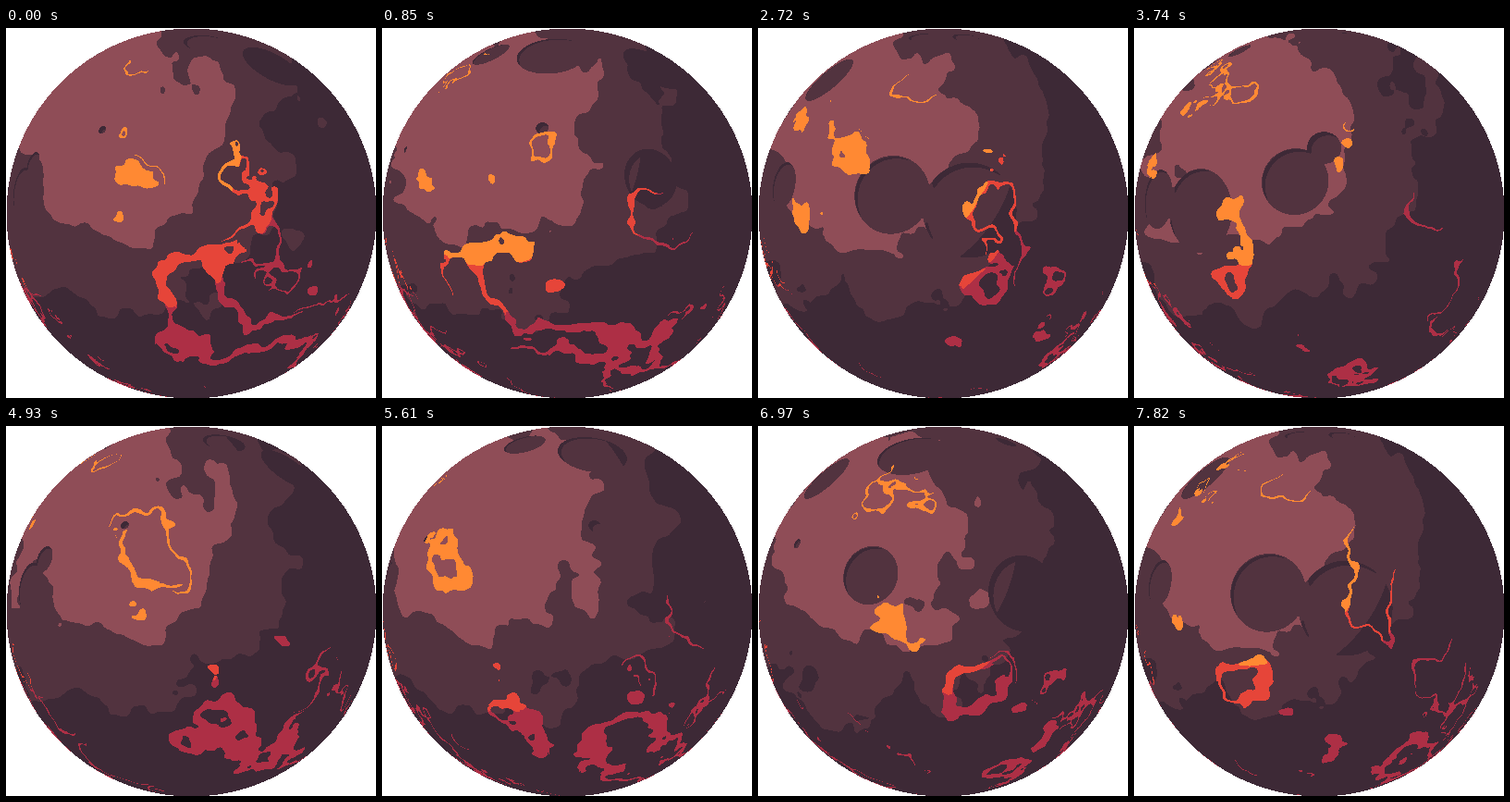
Write an HTML page with a canvas that moves like this. It is 400 px wide and 400 px high and loops after 7.99 s.

```html
<!DOCTYPE html>
<html lang="en">
<head>
<meta charset="utf-8">
<title>Lava planet</title>
<style>
  html, body { margin: 0; width: 100%; height: 100%; overflow: hidden; background: #fff; }
  canvas { display: block; width: 100vw; height: 100vh; }
</style>
</head>
<body>
<canvas id="stage" width="400" height="400"></canvas>
<script>
const SIZE = 400, STEP_MS = 170, STEPS = 47, STEPS_PER_TURN = 60;
const SEED = 8.24, LIGHT = 0.3;

// Colours as little-endian ABGR, ready for a Uint32 view of the pixels.
const color = hex => {
  const n = parseInt(hex, 16);
  return (0xff000000 | (n & 255) << 16 | n & 0xff00 | n >> 16) >>> 0;
};
const LAND = ['8f4d57', '52333f', '3d2936'].map(color);
const LAVA = ['ff8933', 'e64539', 'ad2f45'].map(color);
const shade = (colors, value, border1, border2) =>
  colors[value > border2 ? 2 : value > border1 ? 1 : 0];

const fract = v => v - Math.floor(v);

// Tiling lattice of pseudo-random values.
function makeGrid(width, height) {
  const values = new Float64Array(width * height);
  for (let y = 0; y < height; y++) {
    for (let x = 0; x < width; x++) {
      values[y * width + x] = fract(Math.sin(x * 12.9898 + y * 78.233) * 15.5453 * SEED);
    }
  }
  return { width, height, values };
}
const landGrid = makeGrid(10, 10);
const lavaGrid = makeGrid(20, 10);
const craterGrid = makeGrid(4, 4);

function noise({ width, height, values }, x, y) {
  const ix = Math.floor(x), iy = Math.floor(y);
  const fx = x - ix, fy = y - iy;
  const x0 = ix % width, x1 = (ix + 1) % width;
  const row0 = iy % height * width, row1 = (iy + 1) % height * width;
  const sx = fx * fx * (3 - 2 * fx), sy = fy * fy * (3 - 2 * fy);
  const top = values[row0 + x0] + (values[row0 + x1] - values[row0 + x0]) * sx;
  const bottom = values[row1 + x0] + (values[row1 + x1] - values[row1 + x0]) * sx;
  return top + (bottom - top) * sy;
}

function fbm(grid, x, y, octaves) {
  let sum = 0, scale = 0.5;
  for (let i = 0; i < octaves; i++) {
    sum += noise(grid, x, y) * scale;
    x *= 2;
    y *= 2;
    scale /= 2;
  }
  return sum;
}

// One disc per lattice cell: 0 inside, 1 outside, with a narrow soft rim.
function disc(x, y) {
  const row = Math.floor(y);
  x += row * 0.31;
  const column = Math.floor(x);
  const h = craterGrid.values[row % 4 * 4 + column % 4];
  const center = 0.25 + h * 0.5, r = h * 0.25;
  const m = Math.hypot(x - column - center, y - row - center);
  const t = Math.min(1, Math.max(0, (m - 0.9 * r) / (0.1 * r)));
  return t * t * (3 - 2 * t);
}

function crater(x, y, scroll) {
  const cx = x * 3.5 + scroll, cy = y * 3.5;
  return 1 - disc(cx + 11, cy + 11) * disc(cx + 12, cy + 12);
}

// Everything about a pixel that does not depend on time.
const points = [];
for (let py = 0; py < SIZE; py++) {
  for (let px = 0; px < SIZE; px++) {
    const u = px / SIZE, v = py / SIZE;
    const cx = u * 2 - 1, cy = v * 2 - 1, rr = cx * cx + cy * cy;
    if (rr >= 0.9999) continue;
    const z = Math.sqrt(1 - rr), warp = fbm(landGrid, u, v, 3);
    points.push({
      index: py * SIZE + px,
      light: Math.hypot(u - LIGHT, v - LIGHT),
      landX: u * 10 + warp,
      landY: v * 10 + warp,
      x: cx / (z + 1) / 2 + 0.5,
      y: cy / (z + 1) / 2 + 0.5
    });
  }
}

function pixelColor(p, turn) {
  const { x, y, light } = p;

  const flow = fbm(lavaGrid, x * 10 + turn * 20, y * 10, 4) * 2.5;
  const river = fbm(lavaGrid, x + flow, y + flow, 4);
  if (river >= 0.579) {
    return shade(LAVA, light * light * 0.4 * (1 - river), 0.019, 0.036);
  }

  const depth = crater(x, y, turn * 8);
  if (depth >= 0.5) {
    const offset = (LIGHT - 0.5) * 0.03;
    const rim = crater(x + offset, y + offset, turn * 8);
    const shadowed = light > 0.4 || rim < depth - (0.5 - light) * 2;
    return LAND[shadowed ? 2 : 1];
  }

  const dim = light + fbm(landGrid, p.landX + turn * 20, p.landY, 3) * 0.3;
  return shade(LAND, dim, 0.4025, 0.6025);
}

const context = document.getElementById('stage').getContext('2d');
const image = context.createImageData(SIZE, SIZE);
const pixels = new Uint32Array(image.data.buffer);

function draw(step) {
  const turn = step / STEPS_PER_TURN;
  for (const p of points) pixels[p.index] = pixelColor(p, turn);
  context.putImageData(image, 0, 0);
}

let shown = -1;
function tick() {
  const step = Math.floor(performance.now() / STEP_MS) % STEPS;
  if (step !== shown) draw(shown = step);
  requestAnimationFrame(tick);
}
tick();
</script>
</body>
</html>
```
